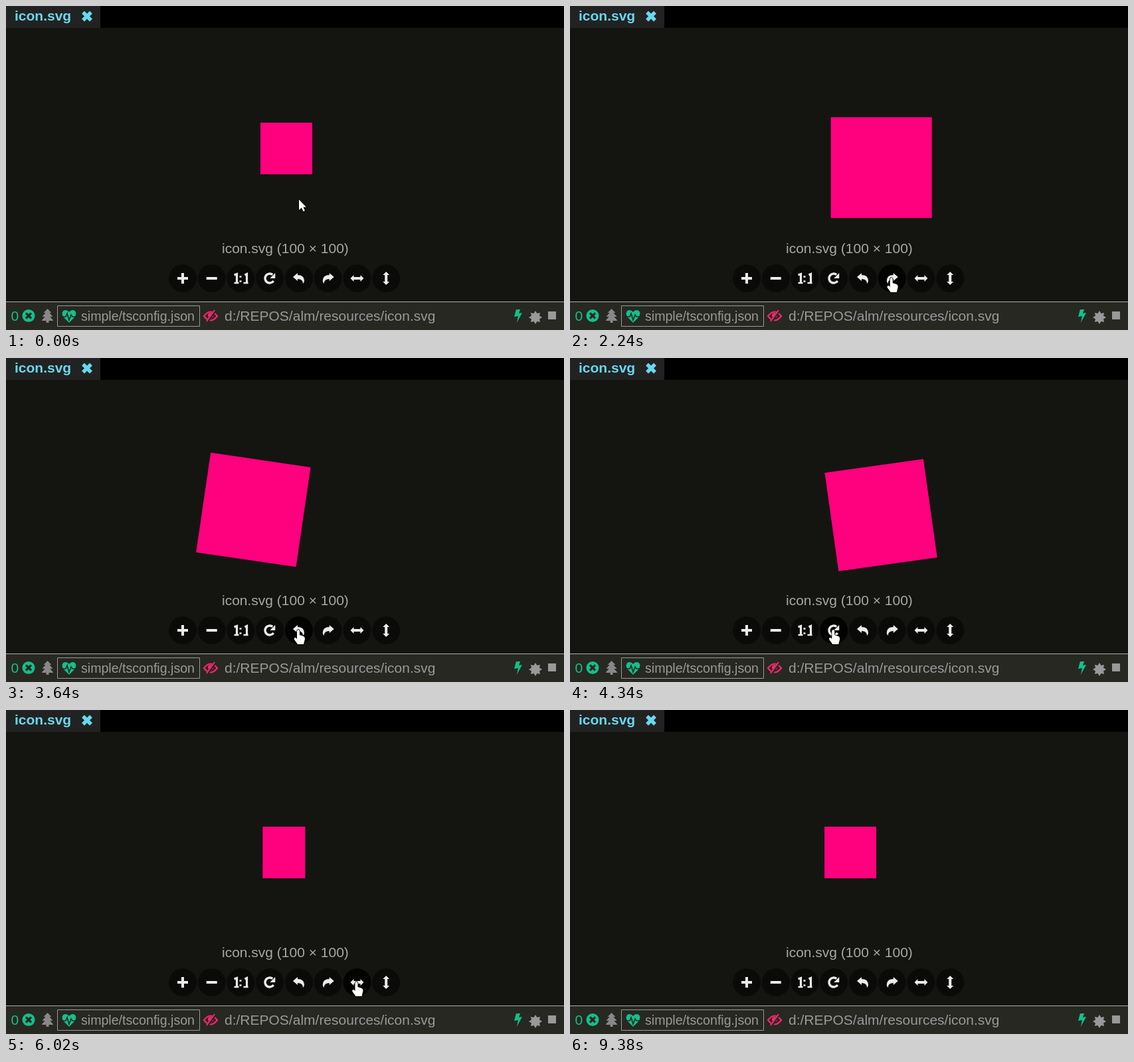
An HTML page with a canvas that plays this animation: 840 by 489 pixels, repeating every 9.94 s.

```html
<!DOCTYPE html>
<html lang="en">
<head>
<meta charset="utf-8">
<title>Image viewer</title>
<style>
html, body { margin: 0; width: 100%; height: 100%; overflow: hidden; background: #141510; }
canvas { display: block; }
</style>
</head>
<body>
<canvas id="stage" width="840" height="489"></canvas>
<script>
const c = document.getElementById('stage').getContext('2d');
const LOOP = 9940, TICK = 70, FADE = 300, MOVE = 210;
const FONT = '"Liberation Sans", Arial, sans-serif';
const GREEN = '#14c08b', GREY = '#999', WHITE = '#ececec', BAR = '#272822', PINK = '#ff007f';

const clamp = v => Math.max(0, Math.min(1, v));
const fade = (t, start) => 1 - (1 - clamp((t - start) / FADE)) ** 1.7;
const clicks = (t, ...starts) => starts.reduce((n, s) => n + fade(t, s), 0);

// Toolbar effects as functions of time
const zoom = t => {
  const steps = clicks(t, 200, 285, 370, 455, 540, 1034, 1174);
  return 1 + (1.1 ** steps - 1) * (1 - fade(t, 4335));
};
const turn = t => Math.PI / 2 *
  (clicks(t, 1804, 2242, 2602, 2910) - clicks(t, 3414, 3664, 3914, 4324));
const flipX = t => 1 - 2 * (clicks(t, 5444, 8174) - clicks(t, 6004, 9084));
const flipY = t => 1 - 2 * (fade(t, 6634) - fade(t, 7194));

// Pointer trips: start time, button reached, depth of the arc below the toolbar
const trips = [[70, 0, 0], [1260, 5, 0], [3010, 4, 18], [4120, 3, 0],
  [5010, 6, 50], [6300, 7, 0], [7200, 1, 0], [7660, 2, 0]];
const buttonX = i => 266 + 43.75 * i;

function pointerAt(t) {
  let x = 441, y = 292;
  for (const [start, button, dip] of trips) {
    const p = clamp((t - start) / MOVE);
    x += (buttonX(button) - 1 - x) * p;
    y += (410 - y) * p + dip * Math.sin(Math.PI * p);
  }
  return [x, y + 90 * clamp((t - 8190) / FADE)];
}

function at(x, y, draw) {
  c.save();
  c.translate(x, y);
  draw();
  c.restore();
}
function box(x, y, w, h, color) {
  c.fillStyle = color;
  c.fillRect(x, y, w, h);
}
function fill(d, color) {
  c.fillStyle = color;
  c.fill(new Path2D(d));
}
function line(d, color, width) {
  c.strokeStyle = color;
  c.lineWidth = width;
  c.stroke(new Path2D(d));
}
function disc(x, y, r, color) {
  c.fillStyle = color;
  c.beginPath();
  c.arc(x, y, r, 0, 7);
  c.fill();
}
function text(s, x, y, size, color, weight = '') {
  c.font = `${weight} ${size}px ${FONT}`;
  c.fillStyle = color;
  c.fillText(s, x, y);
}
const cross = (r, color, width) => line(`M-${r}-${r}L${r} ${r}M${r}-${r}L-${r} ${r}`, color, width);

const curvedArrow = side => {
  c.scale(side, 1);
  fill('M-9-2L-2-8V-5Q8-5 8 4Q8 6 6 8Q6 1-2 1V4Z', WHITE);
};
const doubleArrow = angle => {
  c.rotate(angle);
  fill('M-10 0L-5-5V-2H5V-5L10 0L5 5V2H-5V5Z', WHITE);
};
const icons = [
  () => line('M-8 0H8M0-8V8', WHITE, 4),
  () => line('M-8 0H8', WHITE, 4),
  () => {
    line('M-10-5L-6-6.5V8M6-5L9-6.5V8', WHITE, 3.2);
    line('M-10 7H-3M4 7H11M-2-2.5H1M-2 4.5H1', WHITE, 2.6);
  },
  () => {
    line('M5.5 4A7 7 0 1 1 4-5.5', WHITE, 3.4);
    fill('M8-8V0H0Z', WHITE);
  },
  () => curvedArrow(1),
  () => curvedArrow(-1),
  () => doubleArrow(0),
  () => doubleArrow(Math.PI / 2)
];

function drawImage(t) {
  at(420, 240, () => {
    c.rotate(turn(t));
    c.scale(zoom(t) * flipX(t), zoom(t) * flipY(t));
    box(-37, -64, 78, 78, PINK);
  });
}

function drawToolbar(hovered) {
  text('icon.svg (100 × 100)', 325, 373, 21, 'rgba(204,204,204,.8)');
  icons.forEach((icon, i) => {
    disc(buttonX(i), 411, 21, `rgba(0,0,0,${i === hovered ? 0.85 : 0.5})`);
    at(buttonX(i), 411, icon);
  });
}

function drawTabs() {
  box(0, 0, 840, 33, '#000');
  box(0, 0, 142, 33, '#222');
  text('icon.svg', 13, 22, 21, '#66d9ef', 'bold');
  at(122, 15.5, () => cross(6, '#66d9ef', 5.5));
}

function drawStatus() {
  box(0, 446, 840, 43, BAR);
  box(0, 446, 840, 1, '#aaa');
  text('0', 7.5, 475, 21, GREEN);
  disc(34, 467.5, 9.5, GREEN);
  at(34, 467.5, () => cross(4, BAR, 3.2));
  at(62.5, 457, () =>
    fill('M0 0L6 6H3L8 12H4L9 18H2V21H-2V18H-9L-4 12H-8L-3 6H-6Z', '#888'));
  line('M77.5 452.5H291.5V483.5H77.5Z', GREY, 1);
  at(95, 468, () => {
    fill('M0 10L-8 2C-15-7-5-13 0-6C5-13 15-7 8 2Z', GREEN);
    line('M-11 1H-5L-3-4L0 6L3-2L5 1H11', BAR, 1.7);
  });
  text('simple/tsconfig.json', 113, 475, 19.6, GREY);
  at(308, 468, () => {
    line('M-10 0Q0-13 10 0Q0 13-10 0Z', '#f92672', 2.2);
    disc(0, -1, 4, '#f92672');
    line('M-5 9L7-9', BAR, 4);
    line('M-6 8L6-9', '#f92672', 2);
  });
  text('d:/REPOS/alm/resources/icon.svg', 329, 475, 21, GREY);
  at(771, 468, () => fill('M-3-10H3L1-4L6-5L-2 10L0 0L-6 1Z', GREEN));
  at(797, 470, () => {
    c.beginPath();
    for (let i = 0; i < 16; i++) {
      const a = i * Math.PI / 8 - Math.PI / 2, r = i % 2 ? 6.5 : 10;
      c.lineTo(r * Math.cos(a), r * Math.sin(a));
    }
    c.fillStyle = GREY;
    c.fill();
  });
  box(816, 461, 12, 12, GREY);
}

function drawPointer(x, y, hand) {
  const d = hand
    ? 'M-2 2Q0-2 2 2V8L8 10Q10 11 10 14L8 22H-1L-6 15Q-7 12-4 12L-2 14Z'
    : 'M0 0V16L4 12.5L6.5 18L9 17L6.5 11.5H11Z';
  at(x, y, () => {
    line(d, '#000', 1.5);
    fill(d, '#fff');
  });
}

function draw(now) {
  const t = Math.floor(now % LOOP / TICK) * TICK;
  const [x, y] = pointerAt(t);
  const hovered = icons.findIndex((_, i) => Math.hypot(x - buttonX(i), y - 411) < 21);
  box(0, 0, 840, 489, '#141510');
  drawImage(t);
  drawToolbar(hovered);
  drawTabs();
  drawStatus();
  drawPointer(x, y, hovered >= 0);
}

const start = performance.now();
(function loop() {
  draw(performance.now() - start);
  requestAnimationFrame(loop);
})();
</script>
</body>
</html>
```
